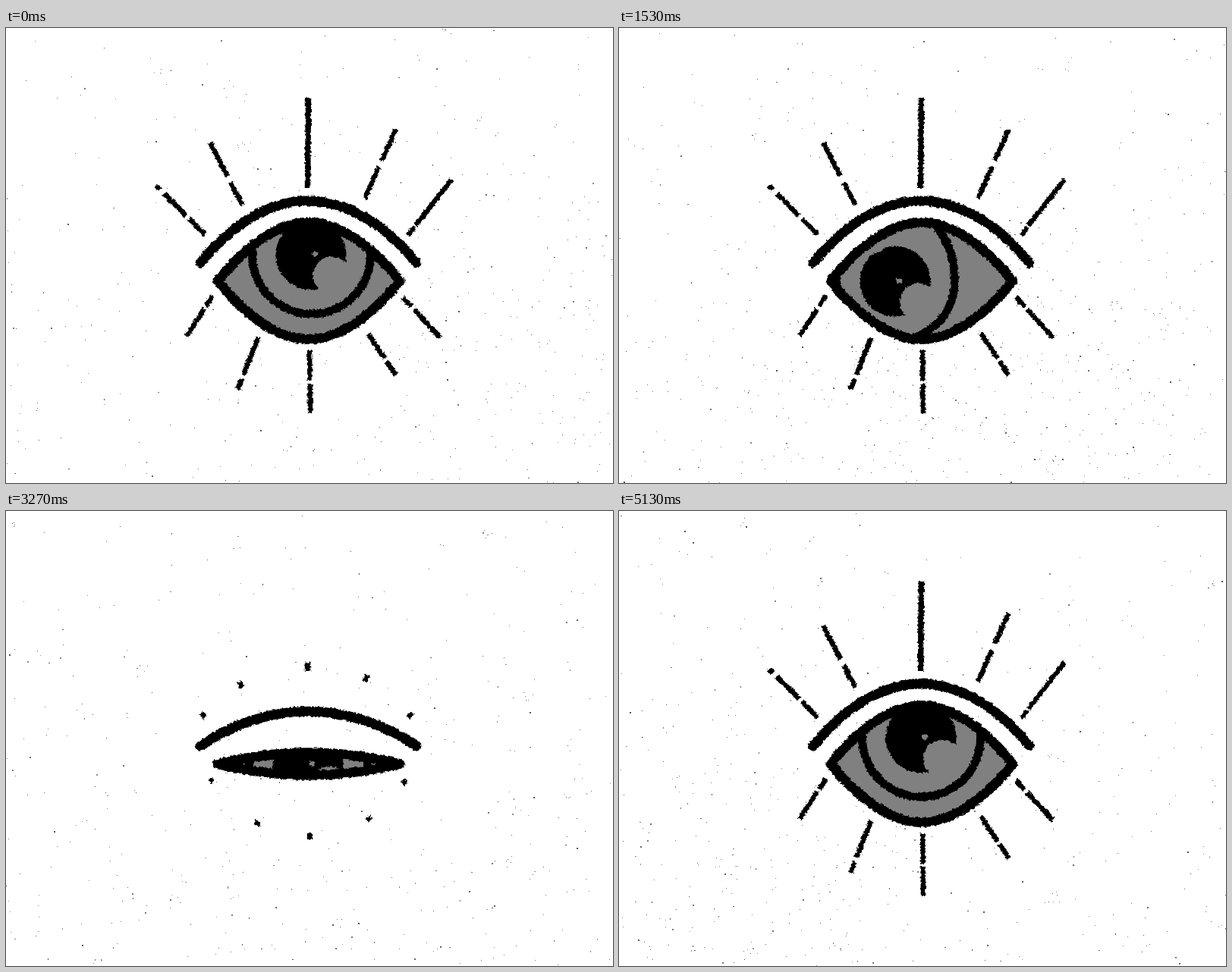
An HTML page with a canvas for the animation above (5.19 s loop, 800x600 px).

```html
<!DOCTYPE html>
<html lang="en">
<head>
<meta charset="utf-8">
<title>Eye</title>
<style>
html, body { margin: 0; width: 100%; height: 100%; overflow: hidden; background: #fff; }
canvas { display: block; width: 800px; height: 600px; }
</style>
</head>
<body>
<canvas id="stage" width="800" height="600"></canvas>
<script>
const W = 800, H = 600, LOOP = 5190, STEP = 200 / 3;
const GRAY = '#808080', MID = 333.5;
const ctx = document.getElementById('stage').getContext('2d');

// Region of the artwork that gets rough edges
const BOX = { x: 180, y: 76, w: 424, h: 448 };
const layer = (w, h) => {
  const c = document.createElement('canvas');
  c.width = w;
  c.height = h;
  return c;
};
const artCanvas = layer(BOX.w, BOX.h), roughCanvas = layer(BOX.w, BOX.h);
const art = artCanvas.getContext('2d', { willReadFrequently: true });
const rough = roughCanvas.getContext('2d');

// Inner end, outer end, then gaps as fractions of the length
const RAYS = [
  { p: [397.5, 211, 398.5, 92], gaps: [], w: 7.5 },
  { p: [473, 225, 513.5, 134], gaps: [.46, .55] },
  { p: [530, 273, 587, 200], gaps: [.14, .17] },
  { p: [311.5, 233, 269, 151], gaps: [.36, .46] },
  { p: [262.5, 273, 198, 208], gaps: [.33, .39, .84, .92] },
  { p: [272.5, 353, 238, 406], gaps: [.26, .32] },
  { p: [332.5, 408, 305, 477], gaps: [.71, .79] },
  { p: [400, 425, 401, 508], gaps: [.48, .53] },
  { p: [477, 403, 514, 458], gaps: [.6, .66] },
  { p: [523, 355, 572, 408], gaps: [.23, .3] }
];

function random(seed) {
  let a = seed * 2654435761 | 0;
  return () => {
    a = a + 0x6D2B79F5 | 0;
    let n = Math.imul(a ^ a >>> 15, 1 | a);
    n = n + Math.imul(n ^ n >>> 7, 61 | n) ^ n;
    return ((n ^ n >>> 14) >>> 0) / 4294967296;
  };
}

const clamp = v => Math.max(0, Math.min(1, v));
const mix = (a, b, k) => a + (b - a) * k;
const ease = (t, from, to) => (1 - Math.cos(Math.PI * clamp((t - from) / (to - from)))) / 2;

// Smooth wrapping noise, 256 x 256, about -1 to 1
function makeNoise(seed) {
  const cells = 128, size = 256, rnd = random(seed);
  const grid = Array.from({ length: cells * cells }, () => rnd() * 2 - 1);
  const at = (x, y) => grid[(y % cells) * cells + x % cells];
  const out = new Float32Array(size * size);
  for (let y = 0; y < size; y++) {
    for (let x = 0; x < size; x++) {
      const gx = x >> 1, gy = y >> 1, fx = (x & 1) / 2, fy = (y & 1) / 2;
      out[y * size + x] = mix(
        mix(at(gx, gy), at(gx + 1, gy), fx),
        mix(at(gx, gy + 1), at(gx + 1, gy + 1), fx), fy);
    }
  }
  return out;
}
const noiseX = makeNoise(11), noiseY = makeNoise(29);

// Where the iris is at a given time
function gaze(t) {
  if (t > 5100) t -= 78 * STEP;
  if (t < 1133) {
    const a = Math.PI / 2 * Math.pow(clamp((t + 67) / 1200), 1.15);
    return { x: 398 + 71 * Math.sin(a), y: 334 - 35 * Math.cos(a) };
  }
  const left = ease(t, 1133, 1730), back = ease(t, 2021, 2966), up = ease(t, 4100, 4800);
  return { x: 469 - 139 * left + 68 * back, y: 334 - 35 * up };
}

function eyePath(open) {
  const h = 77 * open, low = 51 * open;
  art.beginPath();
  art.moveTo(279, MID);
  art.bezierCurveTo(320, MID - low, 362, MID - h, 398, MID - h);
  art.bezierCurveTo(436, MID - h, 478, MID - low, 519, MID);
  art.bezierCurveTo(478, MID + low, 436, MID + h, 398, MID + h);
  art.bezierCurveTo(362, MID + h, 320, MID + low, 279, MID);
  art.closePath();
}

function disc(x, y, r, fill) {
  art.fillStyle = fill;
  art.beginPath();
  art.arc(x, y, r, 0, 7);
  art.fill();
}

function drawEye(t, open) {
  const { x, y } = gaze(t);
  art.save();
  eyePath(open);
  art.clip();
  art.fillStyle = GRAY;
  art.fillRect(BOX.x, BOX.y, BOX.w, BOX.h);

  // Round below, taller above
  art.lineWidth = 11;
  art.beginPath();
  art.ellipse(x + .5, y, 78, 78, 0, 0, Math.PI);
  art.ellipse(x + .5, y, 78, 100, 0, Math.PI, 2 * Math.PI);
  art.stroke();

  disc(x, y, 46.5, '#000');
  disc(x + 28 - (x - 398) * .09, y + 27.5, 25, GRAY);
  disc(x + 5, y - 1, 3.5, GRAY);

  // Nick in the upper left rim
  art.beginPath();
  art.moveTo(x - 31, y - 37);
  art.lineTo(x - 18, y - 39);
  art.lineTo(x - 13, y - 47);
  art.lineTo(x - 31, y - 47);
  art.fill();
  art.restore();

  art.lineWidth = 13;
  eyePath(open);
  art.stroke();
}

function drawBrow(closed) {
  const top = 228 + 40 * closed, low = 310 - (310 - top) * .66;
  art.lineWidth = 13;
  art.beginPath();
  art.moveTo(256, 310);
  art.bezierCurveTo(300, low, 350, top, 398, top);
  art.bezierCurveTo(446, top, 497, low, 541, 310);
  art.stroke();
}

function drawRays(reach) {
  if (reach < .01) return;
  art.lineCap = 'butt';
  for (const { p: [x0, y0, x1, y1], gaps, w = 6.5 } of RAYS) {
    const marks = [0, ...gaps, 1];
    art.lineWidth = w;
    for (let i = 0; i < marks.length; i += 2) {
      const a = marks[i], b = Math.min(marks[i + 1], reach);
      if (a >= b) continue;
      art.beginPath();
      art.moveTo(mix(x0, x1, a), mix(y0, y1, a));
      art.lineTo(mix(x0, x1, b), mix(y0, y1, b));
      art.stroke();
    }
  }
  art.lineCap = 'round';
}

// Shift every pixel a little so that edges look inked
function roughen(rnd) {
  const src = new Uint32Array(art.getImageData(0, 0, BOX.w, BOX.h).data.buffer);
  const image = rough.createImageData(BOX.w, BOX.h);
  const dst = new Uint32Array(image.data.buffer);
  const ox = rnd() * 256 | 0, oy = rnd() * 256 | 0;
  for (let y = 3; y < BOX.h - 3; y++) {
    for (let x = 3; x < BOX.w - 3; x++) {
      const n = (y + oy & 255) * 256 + (x + ox & 255);
      const sx = x + Math.round(noiseX[n] * 1.4), sy = y + Math.round(noiseY[n] * 1.4);
      dst[y * BOX.w + x] = src[sy * BOX.w + sx];
    }
  }
  rough.putImageData(image, 0, 0);
  ctx.drawImage(roughCanvas, BOX.x, BOX.y);
}

function drawSpecks(rnd) {
  const speck = (x, y) => {
    const v = 80 + rnd() * 70 | 0, big = rnd();
    ctx.fillStyle = `rgb(${v},${v},${v})`;
    ctx.fillRect(x | 0, y | 0, big > .85 ? 2 : 1, big > .92 || big < .08 ? 2 : 1);
  };
  const bell = () => rnd() + rnd() + rnd() - 1.5;
  for (let i = 0; i < 340; i++) speck(rnd() * W, Math.pow(rnd(), .8) * H);
  const cx = rnd() * W, cy = 300 + rnd() * 280, count = 80 + rnd() * 240;
  for (let i = 0; i < count; i++) speck(cx + bell() * 320, cy + bell() * 230);
  for (let i = 0; i < 6; i++) {
    const x = rnd() * W, y = rnd() * H;
    for (let j = 0; j < 4; j++) speck(x + bell() * 9, y + bell() * 9);
  }
}

function draw(frame) {
  const t = frame * STEP, rnd = random(frame + 1);
  const lid = ease(t, 2120, 3050) - ease(t, 3050, 3800);
  const fold = ease(t, 2200, 2867) - ease(t, 3133, 3800);

  ctx.fillStyle = '#fff';
  ctx.fillRect(0, 0, W, H);
  drawSpecks(rnd);

  art.setTransform(1, 0, 0, 1, 0, 0);
  art.clearRect(0, 0, BOX.w, BOX.h);
  art.translate(-BOX.x, -BOX.y);
  art.strokeStyle = '#000';
  art.lineCap = art.lineJoin = 'round';
  drawRays(1 - fold);
  drawBrow(fold);
  drawEye(t, 1 - lid);
  roughen(rnd);
}

const start = performance.now();
let shown = -1;
function tick() {
  const t = Math.max(0, performance.now() - start) % LOOP;
  const frame = Math.floor((Math.floor(t / 10) * 10 + 5) / STEP);
  if (frame !== shown) draw(shown = frame);
  requestAnimationFrame(tick);
}
tick();
</script>
</body>
</html>
```
